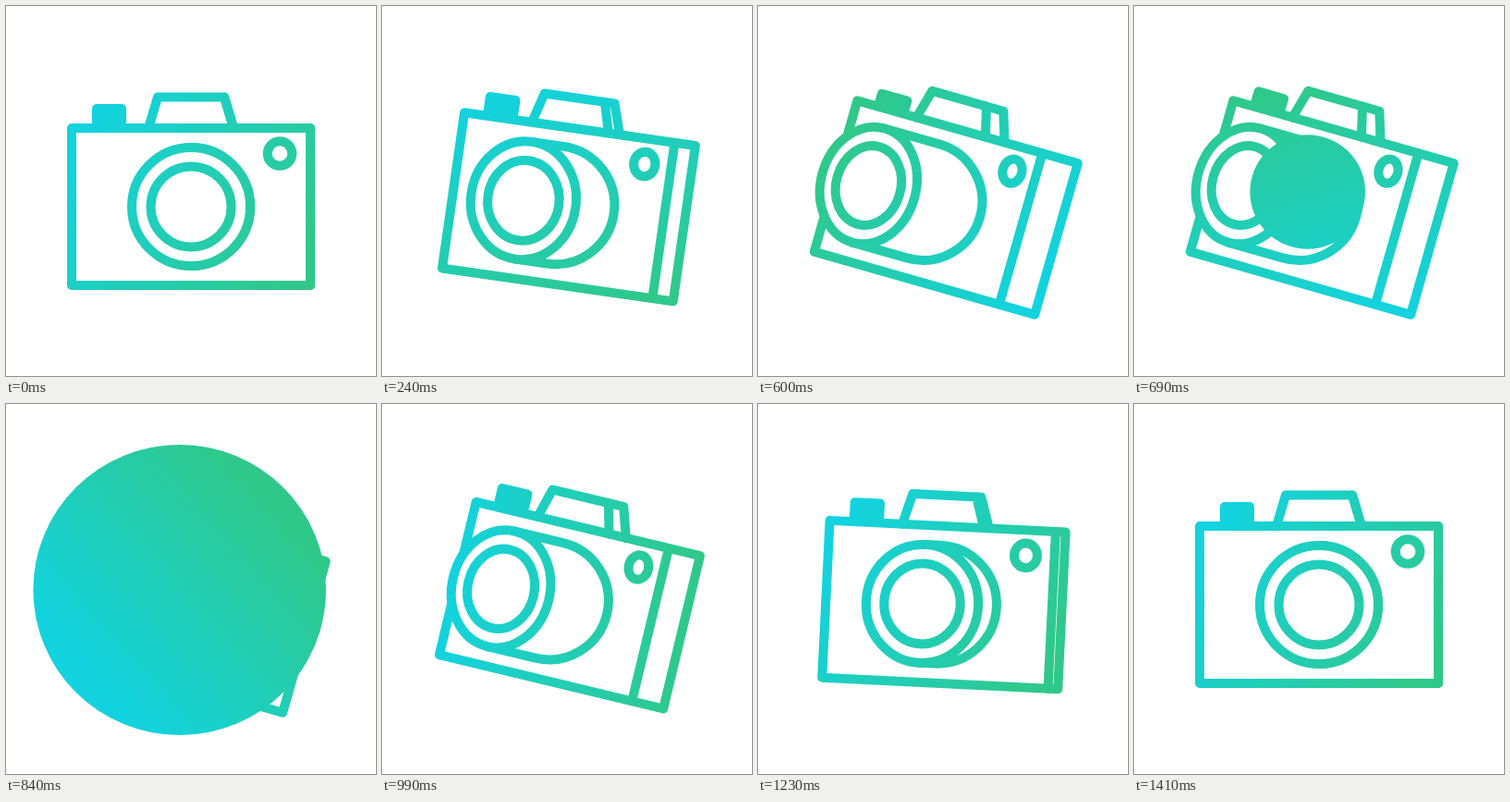
These frames come from a looping animation (400 px wide and 400 px high, 3.47 s). An HTML page with a canvas:

```html
<!DOCTYPE html>
<html lang="en">
<head>
<meta charset="utf-8">
<title>Camera</title>
<style>
  html, body { margin: 0; width: 100%; height: 100%; overflow: hidden; background: #fff; }
  canvas { display: block; }
</style>
</head>
<body>
<canvas id="stage" width="400" height="400"></canvas>
<script>
const ctx = document.getElementById('stage').getContext('2d');
const LOOP = 3470, STEP = 30, END = 1410;
const CX = 200, CY = 217;
const RAD = Math.PI / 180;

// Smooth 0..1 ramp between two times
function ramp(t, from, to) {
  const x = Math.min(1, Math.max(0, (t - from) / (to - from)));
  return x * x * (3 - 2 * x);
}

// Rises over a..b, falls over c..d
const pulse = (t, a, b, c, d) => ramp(t, a, b) - ramp(t, c, d);

function paint(angle) {
  const x = 134 * Math.cos(angle), y = 134 * Math.sin(angle);
  const g = ctx.createLinearGradient(-x, -y - 5, x, y - 5);
  g.addColorStop(0, '#13d3df');
  g.addColorStop(1, '#30c88a');
  ctx.strokeStyle = ctx.fillStyle = g;
}

function line(points, close) {
  ctx.beginPath();
  points.forEach(([x, y]) => ctx.lineTo(x, y));
  if (close) ctx.closePath();
  ctx.stroke();
}

function ring(x, y, rx, ry) {
  ctx.beginPath();
  ctx.ellipse(x, y, rx, ry, 0, 0, 2 * Math.PI);
  ctx.stroke();
}

// Strokes a path over a white interior
function solid(build) {
  ctx.beginPath();
  build();
  ctx.save();
  ctx.fillStyle = '#fff';
  ctx.fill();
  ctx.restore();
  ctx.stroke();
}

function drawBody(turn, press) {
  const left = -129 + 8.5 * turn, edge = 129 - 41.5 * turn, right = 129 - 1.7 * turn;
  const top = -85, bottom = 85, roof = -118.5 + 1.3 * turn;

  ctx.beginPath();
  ctx.roundRect(-107 + 5 * turn, -111 + press, 37 + 1.5 * turn, 25 - press, 5);
  ctx.fill();

  // Viewfinder hump with its side face
  const frontX = 36 - 20.5 * turn;
  line([[-46 - 8 * turn, top], [-36 - 9.5 * turn, roof], [frontX, roof], [46 - 22.5 * turn, top]]);
  line([[frontX, roof], [36 - 1.5 * turn, roof], [46 - turn, top]]);

  line([[left, top], [right, top], [right, bottom], [left, bottom]], true);
  line([[edge, top], [edge, bottom]]);
}

function drawLens(turn) {
  const r = 64, squeeze = 1 - 0.195 * turn;
  const front = -83.8 * turn, base = -22.5 * turn;

  solid(() => {
    ctx.moveTo(front, -r);
    ctx.lineTo(base, -r);
    ctx.arc(base, 0, r, -Math.PI / 2, Math.PI / 2);
    ctx.lineTo(front, r);
  });
  solid(() => ctx.ellipse(front, 0, r * squeeze, r, 0, 0, 2 * Math.PI));
  ring(front, 0, 43.5 * squeeze, 43.5);
}

function draw(t) {
  const tilt = 15.9 * RAD * pulse(t, 0, 472, 870, 1362);
  const turn = pulse(t, 0, 440, 870, 1416);
  const press = 6.5 * pulse(t, 480, 600, 640, 760);
  const flash = pulse(t, 600, 810, 840, 975);
  const hue = (32 + 360 * ramp(t, 0, 1185)) * RAD;

  ctx.setTransform(1, 0, 0, 1, 0, 0);
  ctx.fillStyle = '#fff';
  ctx.fillRect(0, 0, 400, 400);
  ctx.lineWidth = 10;
  ctx.lineJoin = ctx.lineCap = 'round';

  ctx.translate(CX, CY);
  ctx.save();
  ctx.rotate(tilt);
  paint(hue - tilt);
  drawBody(turn, press);
  ring(96 - 34.5 * turn, -57.5, 13.3 * (1 - 0.22 * turn), 13.3);
  drawLens(turn);
  ctx.restore();

  if (flash > 0) {
    paint(hue);
    ctx.beginPath();
    ctx.ellipse(-12.3, -16, 158.3 * flash, 157 * flash, 0, 0, 2 * Math.PI);
    ctx.fill();
  }
}

const start = performance.now();
function tick() {
  const t = (performance.now() - start) % LOOP;
  draw(Math.min(END, Math.floor(t / STEP) * STEP));
  requestAnimationFrame(tick);
}
tick();
</script>
</body>
</html>
```
